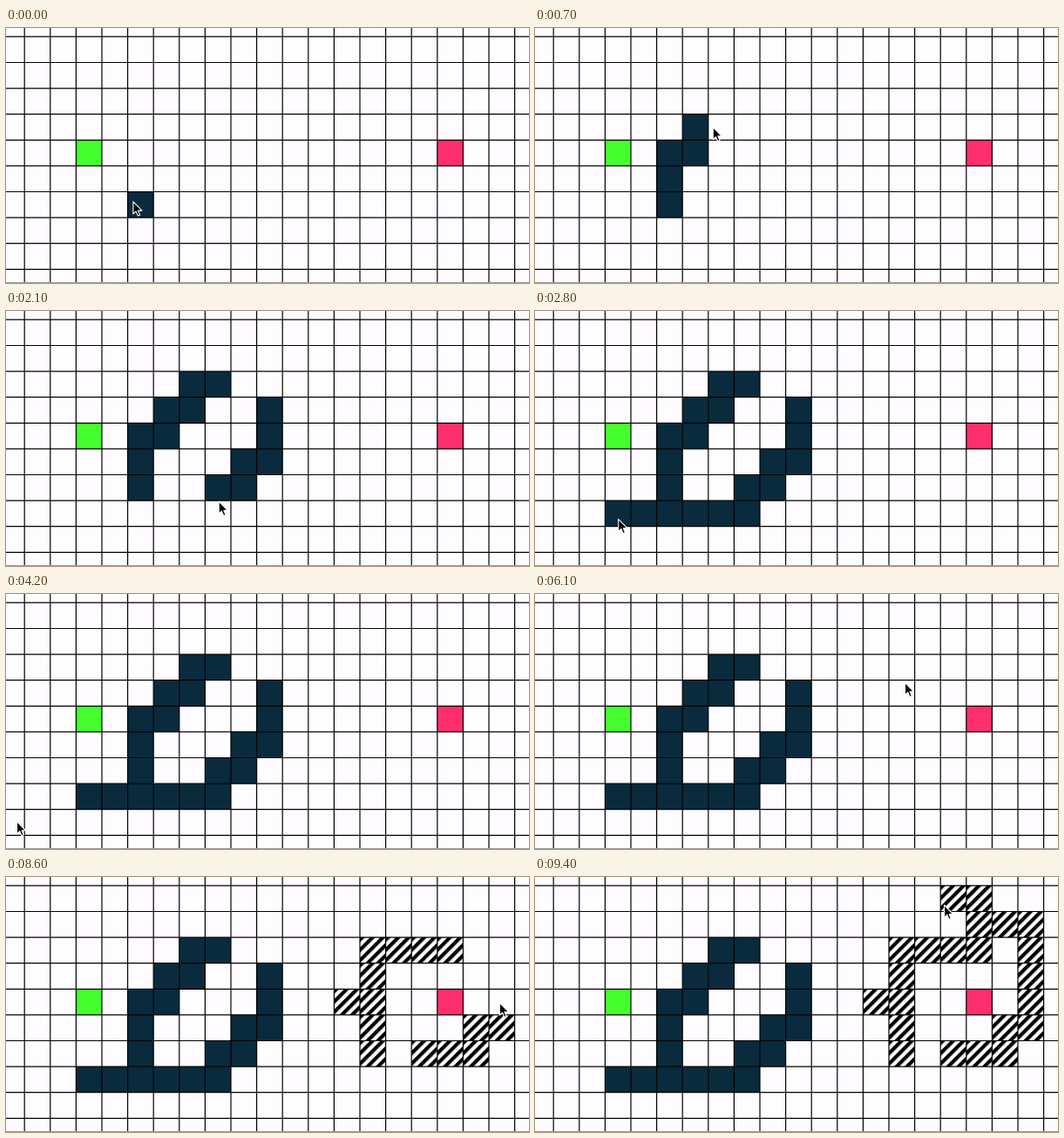
An HTML page that plays this animation: 600 px wide and 292 px high, repeating every 9.5 s.

```html
<!DOCTYPE html>
<html lang="en">
<head>
<meta charset="utf-8">
<title>Grid drawing</title>
<style>
  html, body { margin: 0; width: 100%; height: 100%; overflow: hidden; background: #fefcff; }
  svg { display: block; width: 100vw; height: 100vh; }
</style>
</head>
<body>
<svg id="stage" viewBox="0 0 600 292">
  <defs>
    <pattern id="hatch" width="8.4" height="8.4" patternUnits="userSpaceOnUse"
             patternTransform="translate(29.6 29.6) rotate(-135)">
      <rect width="8.4" height="8.4" fill="#fefcff"/>
      <rect x="4.2" width="4.2" height="8.4" fill="#000"/>
    </pattern>
  </defs>
  <g id="cells"></g>
  <path id="grid" stroke="#000" stroke-width="1.2"/>
  <path d="M0 291.5H600" stroke="#999"/>
  <path id="cursor" d="M.5 .5V14.6L3.7 11.6L6 16.8L8.3 15.8L6.1 10.8H10.6Z"
        fill="#000" stroke="#fff" stroke-width="1.1" stroke-linejoin="round"/>
</svg>
<script>
const LOOP = 9500, TICK = 100;
const SIZE = 29.6, LEFT = 21.2, TOP = 9.9;
const WALL = "#0a2b3e", HATCH = "url(#hatch)";

// Strokes run through corner cells; grip is the pointer's offset from the cell centre at start and end.
const strokes = [
  { from: 0, to: 10, fill: WALL, corners: [[4, 6], [4, 4], [7, 2]], grip: [[-9, -4], [-6, 1]] },
  { from: 14, to: 28, fill: WALL, corners: [[9, 3], [9, 5], [7, 7], [2, 7]], grip: [[1, -5], [0, 6]] },
  { from: 70, to: 79, fill: HATCH, grip: [[-14, -4], [-14, -4]],
    corners: [[16, 2], [13, 2], [13, 4], [12, 4], [13, 4], [13, 6]] },
  { from: 81, to: 94, fill: HATCH, grip: [[2, -22], [-11, 7]],
    corners: [[15, 6], [17, 6], [17, 5], [18, 5], [18, 1], [16, 1], [16, 0], [15, 0]] }
];
// Pointer away from the strokes: [tick, x, y]
const roaming = [
  [30, 88, 240], [35, 88, 240], [38, 65, 255], [41, 65, 255], [42, 12, 260],
  [61, 424, 101], [67, 525, 72], [69, 525, 72]
];
const GONE = 42, BACK = 61;

const byId = id => document.getElementById(id);
const colX = c => LEFT + SIZE * c;
const rowY = r => TOP + SIZE * r;
const mix = (a, b, k) => a + (b - a) * k;

// Side-by-side cells from a to b, excluding a.
function walk([ax, ay], [bx, by]) {
  const w = Math.abs(bx - ax), h = Math.abs(by - ay);
  const sx = Math.sign(bx - ax), sy = Math.sign(by - ay);
  const cells = [];
  let i = 0, j = 0;
  while (i < w || j < h) {
    if (j === h || (i < w && (i + 0.5) * h <= (j + 0.5) * w)) i++;
    else j++;
    cells.push([ax + sx * i, ay + sy * j]);
  }
  return cells;
}

function addCell([c, r], fill) {
  const rect = document.createElementNS("http://www.w3.org/2000/svg", "rect");
  const attrs = { width: SIZE, height: SIZE, fill, transform: `translate(${colX(c)} ${rowY(r)})` };
  for (const key in attrs) rect.setAttribute(key, attrs[key]);
  byId("cells").appendChild(rect);
  return rect;
}

const painted = [];
const path = [...roaming];

for (const { from, to, fill, corners, grip: [start, end] } of strokes) {
  const cells = [corners[0]];
  for (let i = 1; i < corners.length; i++) cells.push(...walk(corners[i - 1], corners[i]));
  cells.forEach((cell, i) => {
    const k = i / (cells.length - 1), tick = mix(from, to, k);
    painted.push({ tick, node: addCell(cell, fill) });
    path.push([
      tick,
      colX(cell[0] + 0.5) + mix(start[0], end[0], k),
      rowY(cell[1] + 0.5) + mix(start[1], end[1], k)
    ]);
  });
}
path.sort((a, b) => a[0] - b[0]);

addCell([2, 4], "#45ff2e");
addCell([16, 4], "#ff2e6c");

let lines = "";
for (let c = 0; c < 20; c++) lines += `M${colX(c)} 0V292`;
for (let r = 0; r < 10; r++) lines += `M0 ${rowY(r)}H600`;
byId("grid").setAttribute("d", lines);

function pointerAt(tick) {
  const next = Math.max(1, path.findIndex(p => p[0] >= tick));
  const [t0, x0, y0] = path[next - 1], [t1, x1, y1] = path[next];
  const k = (tick - t0) / (t1 - t0);
  return [mix(x0, x1, k), mix(y0, y1, k)];
}

const cursor = byId("cursor");

function render(time) {
  const tick = Math.floor((time % LOOP) / TICK);
  for (const { tick: start, node } of painted) {
    node.style.display = tick >= start ? "" : "none";
  }
  cursor.style.display = tick > GONE && tick < BACK ? "none" : "";
  cursor.setAttribute("transform", `translate(${pointerAt(tick)})`);
}

const begin = performance.now();
function loop() {
  render(performance.now() - begin);
  requestAnimationFrame(loop);
}
loop();
</script>
</body>
</html>
```
